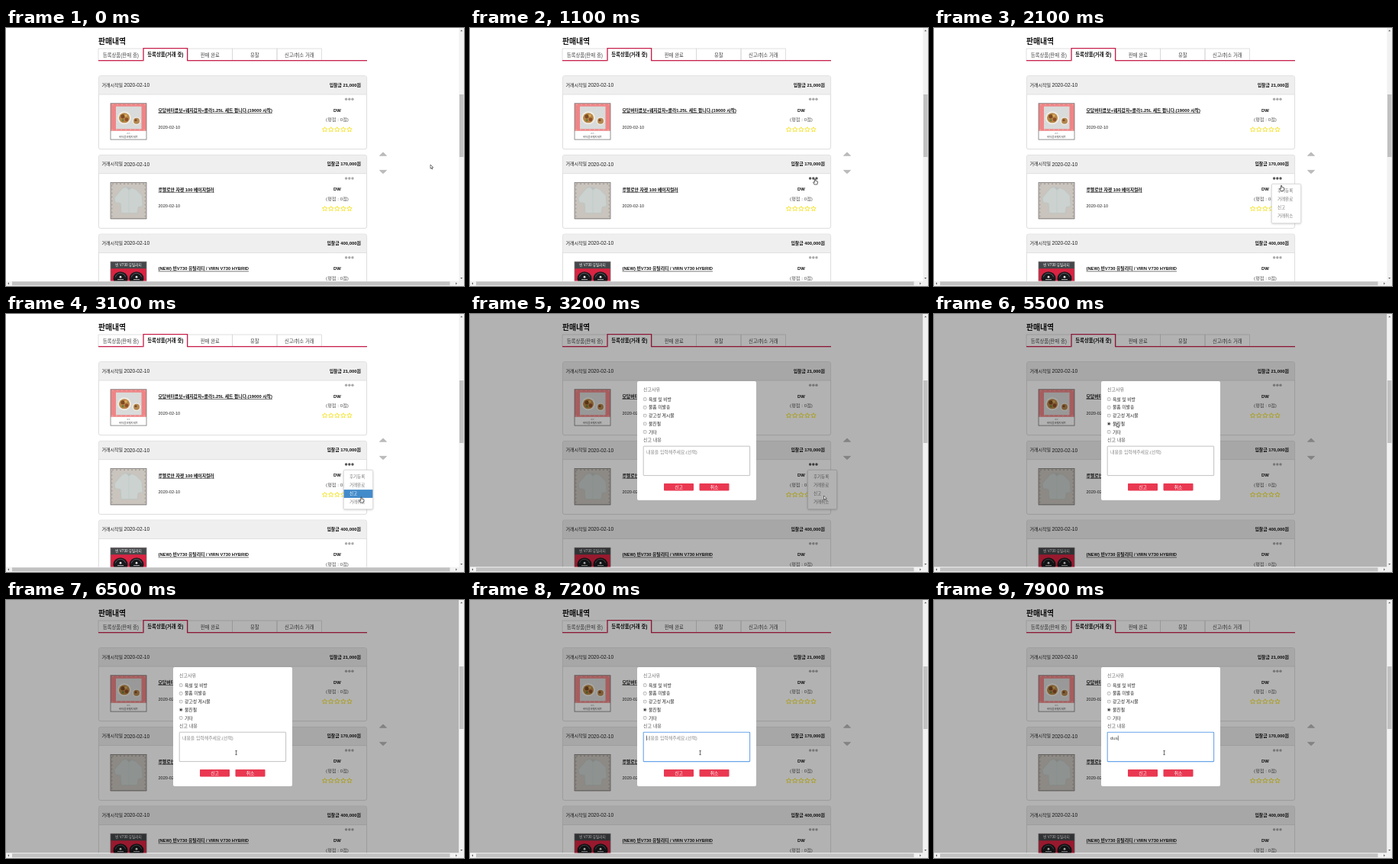
Animation of 600 by 338 pixels, one loop 8000 ms. Source, as an HTML page with a canvas:

```html
<!DOCTYPE html>
<html lang="ko">
<head>
<meta charset="utf-8">
<title>판매내역</title>
<style>
  html, body { margin: 0; width: 100%; height: 100%; overflow: hidden; background: #fff; }
  canvas { display: block; width: 600px; height: 338px; }
</style>
</head>
<body>
<canvas id="stage"></canvas>
<script>
const W = 600, H = 338, LOOP = 8000;
const FONT = '"Liberation Sans", "Noto Sans CJK KR", "Noto Sans CJK", sans-serif';
const canvas = document.getElementById('stage');
const c = canvas.getContext('2d');
const dpr = window.devicePixelRatio || 1;
canvas.width = W * dpr;
canvas.height = H * dpr;

// Moments of the story, in ms
const HOVER = 850, OPEN = 1500, MODAL = 3150, CLOSE = 3400, PICK = 5350, FOCUS = 6900;
const KEYS = [7450, 7650, 7850];

// Pointer path: time, x, y of the hot spot
const PATH = [
  [0, 556, 179], [150, 556, 179], [900, 452, 198], [1900, 452, 198],
  [2500, 464, 230], [2900, 465.5, 240], [3120, 465.5, 240], [3200, 463.5, 238],
  [3700, 463.5, 238], [4350, 242, 124.5], [4650, 242, 124.5],
  [5200, 239.5, 143], [5500, 239.5, 143], [6200, 301.5, 200], [LOOP, 301.5, 200]
];

const CARDS = [
  { price: '21,000', title: '모담버터콤보+웨지감자+콜라1.25L 세트 팝니다.(19000 시작)', thumb: foodThumb },
  { price: '170,000', title: '루벨로안 자켓 100 베이지컬러', thumb: shirtThumb },
  { price: '400,000', title: '(NEW) 빈V730 유틸리티 / VIRN V730 HYBRID', thumb: clubThumb }
];
const MENU = ['후기등록', '거래완료', '신고', '거래취소'];
const REASONS = ['욕설 및 비방', '물품 미발송', '광고성 게시물', '불친절', '기타'];

function rect(x, y, w, h, fill) {
  c.fillStyle = fill;
  c.fillRect(x, y, w, h);
}

function box(x, y, w, h, r, fill, stroke, lw = 0.8) {
  c.beginPath();
  c.roundRect(x, y, w, h, r);
  if (fill) { c.fillStyle = fill; c.fill(); }
  if (stroke) { c.strokeStyle = stroke; c.lineWidth = lw; c.stroke(); }
}

function disc(x, y, r, fill, ry = r) {
  c.beginPath();
  c.ellipse(x, y, r, ry, 0, 0, 7);
  c.fillStyle = fill;
  c.fill();
}

function poly(pts, fill, stroke, lw = 0.6) {
  c.beginPath();
  pts.forEach(([x, y]) => c.lineTo(x, y));
  c.closePath();
  if (fill) { c.fillStyle = fill; c.fill(); }
  if (stroke) { c.strokeStyle = stroke; c.lineWidth = lw; c.stroke(); }
}

// Text centred vertically on y; returns its width
function put(s, x, y, size, color = '#222', weight = 400, align = 'left') {
  c.font = `${weight} ${size}px ${FONT}`;
  c.fillStyle = color;
  c.textAlign = align;
  c.fillText(s, x, y + size * 0.36);
  return c.measureText(s).width;
}

function star(x, y) {
  const pts = Array.from({ length: 10 }, (_, i) => {
    const a = i * Math.PI / 5 - Math.PI / 2, r = i % 2 ? 1.6 : 3.4;
    return [x + r * Math.cos(a), y + r * Math.sin(a)];
  });
  poly(pts, null, '#f3e21c', 0.85);
}

function foodThumb(x, y) {
  rect(x, y, 47, 48, '#fff');
  rect(x, y, 47, 36, '#ee8587');
  for (let i = 0; i < 8; i++) {
    rect(x + 2 + i * 6, y + 1, 2, 1, '#f4a6a4');
    rect(x + 1 + i * 6, y + 34, 2, 1, '#f4a6a4');
  }
  rect(x + 7, y + 4, 33.5, 29.5, '#d9dbda');
  disc(x + 18, y + 19, 9, '#f0ece4', 8.5);
  disc(x + 18, y + 19, 7, '#b98546', 6.5);
  disc(x + 16, y + 17, 2.6, '#7d4a24');
  disc(x + 21, y + 21, 2.4, '#8f4f28');
  disc(x + 20, y + 16, 1.8, '#d9ae5d');
  disc(x + 16, y + 22, 1.6, '#6d7d3a');
  disc(x + 34, y + 23, 5.4, '#f0ece4');
  disc(x + 34, y + 23, 4, '#b4874f');
  disc(x + 33, y + 22, 1.5, '#7d4a24');
  put('세트', x + 23.5, y + 39.5, 2.6, '#888', 400, 'center');
  put('버터콤보웨지세트', x + 23.5, y + 43.8, 3.4, '#444', 400, 'center');
}

function shirtThumb(x, y) {
  rect(x, y, 47, 48, '#c9c4bd');
  for (let i = 0; i < 9; i++) {
    rect(x + 2 + i * 5, y + 1, 2, 1.5, '#aaa199');
    rect(x + 1, y + 3 + i * 5, 1.5, 2, '#b0a59b');
    rect(x + 44.5, y + 3 + i * 5, 1.5, 2, '#b0a59b');
  }
  const p = [[15, 8], [20, 6], [28, 7], [33, 9], [41, 17], [42, 31], [36, 32], [35, 40], [14, 40], [13, 27], [6, 26], [5, 20]];
  poly(p.map(([a, b]) => [x + a, y + b]), '#cbd2d0', '#b9c3c2');
  poly([[20, 6], [24, 10], [28, 7]].map(([a, b]) => [x + a, y + b]), '#bcc0bd');
  c.beginPath();
  c.moveTo(x + 24, y + 10);
  c.lineTo(x + 24, y + 40);
  c.strokeStyle = '#bac4c3';
  c.lineWidth = 0.5;
  c.stroke();
}

function clubThumb(x, y) {
  rect(x, y, 47, 48, '#d92442');
  rect(x, y, 47, 9, '#45484b');
  put('빈 V730 유틸리티', x + 23.5, y + 4.5, 4.6, '#fff', 400, 'center');
  for (const dx of [13, 34]) {
    disc(x + dx, y + 22, 9.5, '#17181b', 9);
    c.beginPath();
    c.arc(x + dx, y + 22, 7, 3.4, 6);
    c.strokeStyle = '#777b80';
    c.lineWidth = 0.7;
    c.stroke();
    disc(x + dx, y + 20, 1.4, '#e8e8e8');
    rect(x + dx - 4, y + 23, 8, 0.8, '#d0d0d0');
  }
}

function tabs() {
  const names = ['등록상품(판매 중)', '등록상품(거래 중)', '판매 완료', '유찰', '신고/취소 거래'];
  const edge = i => 121 + i * 58.5;
  names.forEach((s, i) => {
    c.strokeStyle = '#d8d8d8';
    c.lineWidth = 0.8;
    if (i !== 1) c.strokeRect(edge(i), 27, 58.5, 15.5);
  });
  rect(121, 42, 352, 1.3, '#c8204c');
  rect(179.5, 26, 58.5, 18, '#fff');
  c.beginPath();
  c.moveTo(180, 43.3);
  c.lineTo(180, 26.6);
  c.lineTo(237.6, 26.6);
  c.lineTo(237.6, 43.3);
  c.strokeStyle = '#c8204c';
  c.lineWidth = 1.3;
  c.stroke();
  names.forEach((s, i) => {
    const on = i === 1;
    put(s, edge(i) + 29.3, on ? 35 : 36, 6.4, on ? '#111' : '#444', on ? 700 : 400, 'center');
  });
}

function card(item, y, dark) {
  box(121.4, y + 0.4, 351.2, 96, 2.5, '#fff', '#d4d4d4');
  box(121.8, y + 0.8, 350.4, 24, [2.5, 2.5, 0, 0], '#efefef');
  rect(121.5, y + 24.4, 351, 0.7, '#d8d8d8');
  const w = put('거래시작일 ', 125.5, y + 12.3, 6, '#222');
  put('2020-02-10', 125.5 + w - 0.3, y + 12.3, 6.6, '#222');
  put(`입찰금 ${item.price}원`, 465, y + 12.3, 5.9, '#111', 700, 'right');

  item.thumb(137, y + 36.5);
  c.strokeStyle = '#777';
  c.lineWidth = 0.8;
  c.strokeRect(137, y + 36.5, 47, 47.3);

  const tw = put(item.title, 199.5, y + 45.5, 5.8, '#111', 700);
  rect(199.5, y + 48.9, tw, 0.6, '#222');
  put('2020-02-10', 199.5, y + 67.3, 5.6, '#222');

  for (const x of [445.6, 449.8, 454]) disc(x, y + 31, 1.7, dark ? '#555' : '#aaa');
  put('DW', 434, y + 45.3, 5.9, '#111', 700, 'center');
  put('(평점 : 0점)', 434, y + 57.6, 6.2, '#555', 400, 'center');
  for (let i = 0; i < 5; i++) star(417.6 + i * 8.1, y + 70.8);
}

function menu(pos, t) {
  c.save();
  c.shadowColor = 'rgba(0,0,0,.18)';
  c.shadowBlur = 3 * dpr;
  c.shadowOffsetY = dpr;
  box(442.3, 204.3, 38.4, 51.5, 1.5, '#fff');
  c.restore();
  box(442.3, 204.3, 38.4, 51.5, 1.5, null, '#ccc', 0.7);
  const hover = t < MODAL && pos.y >= 208.5 ? Math.floor((pos.y - 208.5) / 10.8) : -1;
  MENU.forEach((s, i) => {
    const y = 208.5 + i * 10.8;
    if (i === hover) rect(442.6, y, 37.8, 10.8, '#428bca');
    put(s, 450, y + 5, 5.5, i === hover ? '#fff' : '#777');
  });
}

function button(x, label) {
  box(x, 222, 39, 9.4, 0.8, '#ea3851');
  put(label, x + 19.5, 226.7, 5.8, '#fff', 400, 'center');
}

function modal(t) {
  box(219, 88, 156, 156, 2, '#fff');
  put('신고사유', 227, 99.3, 6, '#666');
  REASONS.forEach((s, i) => {
    const y = 111.7 + i * 10.7;
    disc(229.2, y, 2.4, '#999');
    disc(229.2, y, 1.9, '#eee');
    if (i === 3 && t >= PICK) disc(229.2, y, 1.35, '#333');
    put(s, 234, y, 5.8, '#222', 500);
  });
  put('신고 내용', 227, 165, 6, '#555');

  const focus = t >= FOCUS;
  box(227.2, 173.2, 139.4, 38.4, 0.5, '#fff', focus ? '#6aa5e8' : '#aaa', focus ? 1.1 : 0.7);
  const typed = 'dus'.slice(0, KEYS.filter(k => t >= k).length);
  let w = 0;
  if (typed) w = put(typed, 231, 181, 6, '#444');
  else put('내용을 입력해주세요.(선택)', 231, 181, 5.9, '#888');
  const blink = typed ? true : (t - FOCUS) % 1000 < 500;
  if (focus && blink) rect(231 + w + 0.2, 177.6, 0.6, 6.6, '#222');

  button(254, '신고');
  button(300.5, '취소');
}

function pointer(t) {
  const i = Math.max(1, PATH.findIndex(p => p[0] > t));
  const [t0, x0, y0] = PATH[i - 1], [t1, x1, y1] = PATH[i];
  const u = (t - t0) / (t1 - t0), e = u * u * (3 - 2 * u);
  return { x: x0 + (x1 - x0) * e, y: y0 + (y1 - y0) * e };
}

function drawPointer({ x, y }, t) {
  c.save();
  c.translate(x, y);
  if (t >= MODAL && x > 227 && x < 367 && y > 173 && y < 212) {
    rect(-0.3, -2.6, 0.7, 5.4, '#333');
    rect(-1.3, -3, 2.7, 0.6, '#333');
    rect(-1.3, 2.5, 2.7, 0.6, '#333');
  } else if (t >= HOVER && t < MODAL) {
    poly([[-0.6, 0], [0.5, 0], [0.7, 2.2], [3.2, 2.8], [3.6, 4], [2.8, 7], [-0.9, 7], [-2.5, 4.2], [-2, 3.6], [-0.7, 4.4]], '#fff', '#222', 0.7);
  } else {
    poly([[0, 0], [0, 5.2], [1.2, 4.1], [2, 6], [2.9, 5.6], [2.1, 3.8], [3.7, 3.7]], '#fff', '#222', 0.6);
  }
  c.restore();
}

function scrollbars() {
  rect(593.5, 0, 6.5, H, '#f1f1f1');
  rect(0, 331.5, W, 6.5, '#f1f1f1');
  rect(594, 87, 5.5, 82, '#c1c1c1');
  rect(8, 332.2, 573.5, 5, '#c1c1c1');
  const k = '#555';
  poly([[595.2, 4.2], [598.2, 4.2], [596.7, 2.5]], k);
  poly([[595.2, 327], [598.2, 327], [596.7, 328.7]], k);
  poly([[4, 333.2], [4, 336.2], [2.3, 334.7]], k);
  poly([[589.2, 333.2], [589.2, 336.2], [590.9, 334.7]], k);
}

function draw(t) {
  const pos = pointer(t);
  c.setTransform(dpr, 0, 0, dpr, 0, 0);
  rect(0, 0, W, H, '#fff');

  put('판매내역', 121, 17.5, 9.8, '#111', 700);
  tabs();
  CARDS.forEach((item, i) => card(item, 62.3 + i * 103.7, i === 1 && t >= HOVER && t < CLOSE));
  poly([[489.5, 167.2], [494, 163], [498.5, 167.2]], '#bbb', '#bbb', 1);
  poly([[489.5, 186.4], [494, 190.6], [498.5, 186.4]], '#bbb', '#bbb', 1);
  if (t >= OPEN && t < CLOSE) menu(pos, t);

  if (t >= MODAL) {
    rect(0, 0, 593.5, 331.5, 'rgba(0,0,0,.3)');
    modal(t);
  }
  scrollbars();
  drawPointer(pos, t);
}

function tick() {
  draw(performance.now() % LOOP);
  requestAnimationFrame(tick);
}
tick();
</script>
</body>
</html>
```
